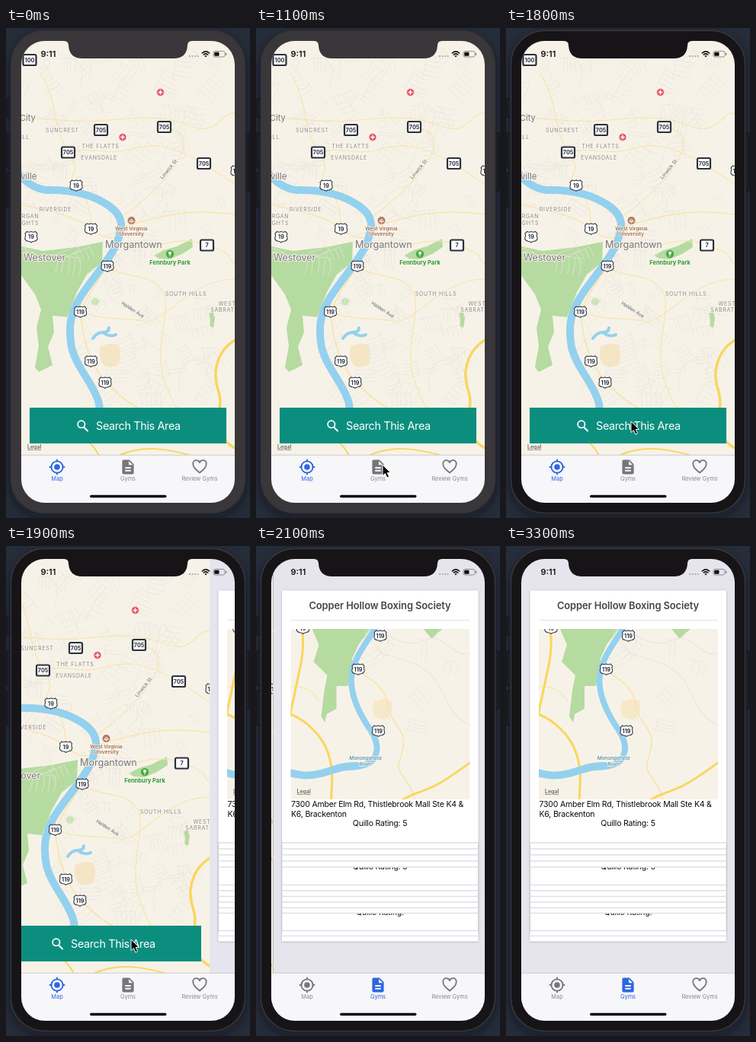
An HTML page for the animation above (3.4 s loop, 320 by 644 pixels).

```html
<!DOCTYPE html>
<html lang="en">
<head>
<meta charset="utf-8">
<title>Gym finder</title>
<style>
html, body { margin: 0; width: 100%; height: 100%; overflow: hidden; background: #262d3a; }
svg { display: block; width: 320px; height: 644px; font-family: Inter, "Liberation Sans", sans-serif; }
.line { fill: none; stroke-linecap: round; stroke-linejoin: round; }
.mid { text-anchor: middle; }
.area { font-size: 7px; letter-spacing: .75px; fill: #898783; }
.town { fill: #77777a; stroke: #f7f2e8; stroke-width: 2px; paint-order: stroke; }
.street { font-size: 6.4px; fill: #5f5e5e; }
.halo { stroke: #faf6ee; stroke-width: 1.5px; paint-order: stroke; }
.body { font-size: 10.5px; letter-spacing: -.2px; fill: #0a0a0a; }
.tab { fill: #77777a; color: #77777a; font-size: 7.4px; }
.tab text { fill: #8a8a8d; }
.tab.on, .tab.on text { fill: #2d66e2; color: #2d66e2; }
</style>
</head>
<body>
<svg id="stage" viewBox="0 0 320 644"></svg>
<script>
const LOOP = 3400, STEP = 100;

// Drawing helpers
const line = (d, color, width) => `<path class="line" d="${d}" stroke="${color}" stroke-width="${width}"/>`;
const area = (d, color) => `<path d="${d}" fill="${color}"/>`;
const text = (x, y, s, cls = '', attrs = '') => `<text x="${x}" y="${y}" class="${cls}" ${attrs}>${s}</text>`;
const box = (x, y, w, h, color, attrs = '') => `<rect x="${x}" y="${y}" width="${w}" height="${h}" fill="${color}" ${attrs}/>`;
const at = (x, y, s, k = 1) => `<g transform="translate(${x} ${y}) scale(${k})">${s}</g>`;
const place = (draw, list) => list.map(p => draw(...p)).join('');

const sign = (x, y, s) => at(x, y,
  box(-8.5, -7, 17, 14, '#fff', 'rx="1.8" stroke="#2c303c" stroke-width="2.2"') +
  text(0, 2.7, s, 'mid', 'font-size="7.2" font-weight="700" fill="#2c303c"'));

const shield = (x, y, s) => at(x, y,
  `<path d="M-5.5-7Q-3-5.5 0-7Q3-5.5 5.5-7L8-4.5Q6.7-2 8 1Q8.7 5 4 5.8Q1.5 6 0 7.4Q-1.5 6-4 5.8Q-8.7 5-8 1Q-6.7-2-8-4.5Z"
    fill="#fff" stroke="#353840" stroke-width="1.1"/>` +
  text(0, 2.7, s, 'mid', 'font-size="7.2" font-weight="700" fill="#2c303c"'));

const clinic = (x, y) => at(x, y,
  '<circle r="4.8" fill="#e2525f" stroke="#f5c5c5" stroke-width=".8"/>' + line('M-2.2 0H2.2M0-2.2V2.2', '#fff', 1.5));

// Faint local streets: small skewed grids and long wandering lanes
function streets(x, y, w, h, blocks, seed) {
  const rnd = () => (seed = seed * 16807 % 2147483647) / 2147483647;
  let d = '';
  for (let i = 0; i < blocks; i++) {
    const cx = x + rnd() * w, cy = y + rnd() * h, a = rnd() * 3, n = 2 + rnd() * 4 | 0, gap = 4 + rnd() * 4;
    const ux = Math.cos(a), uy = Math.sin(a), len = 10 + rnd() * 18;
    for (let k = 0; k < n; k++) {
      const px = cx - uy * gap * k, py = cy + ux * gap * k;
      d += `M${px.toFixed(1)} ${py.toFixed(1)}q${(ux * len / 2 + rnd() * 3).toFixed(1)} ${(uy * len / 2 + rnd() * 3).toFixed(1)} ${(ux * len).toFixed(1)} ${(uy * len).toFixed(1)}`;
    }
    d += `M${cx.toFixed(1)} ${cy.toFixed(1)}l${(-uy * gap * n).toFixed(1)} ${(ux * gap * n).toFixed(1)}`;
    if (i % 4 == 0) d += `q${(rnd() * 40 - 20).toFixed(1)} 12 ${(rnd() * 60 - 30).toFixed(1)} ${(rnd() * 40).toFixed(1)}`;
  }
  return line(d, LANE, .7);
}

const CREAM = '#f7f2e8', WATER = '#94d1ee', GREEN = '#b5dba0', ROAD = '#f8e5ad', MAIN = '#f9d65d', LANE = '#eae4db';

const cityMap = box(20, 17, 280, 544, CREAM) +
  area('M20 287L48 293L92 288L127 281L126 308L106 324L93 347L80 380L61 378L63 400L55 419L61 443L43 452L38 446L43 418L40 394L46 370L38 350L20 325Z', GREEN) +
  area('M194 299L207 292L224 287L244 277L245 288L231 297L214 304L201 303Z', GREEN) +
  area('M112 357l6-3 5 5-4 6-7-2z', '#c9e4b6') +
  area('M266 375l6-2 2 8-2 13-5-2 1-8z', GREEN) +
  area('M124 419q12-7 24-2q5 13-1 26q-12 6-20-1q-7-10-3-23z', '#f4e6c5') +
  streets(30, 30, 255, 130, 38, 71) + streets(22, 170, 265, 150, 46, 913) + streets(105, 320, 180, 165, 36, 4407) +
  place(line, [
    ['M45 60C70 100 60 130 82 163S75 190 92 207S110 240 112 264', ROAD, 1.3],
    ['M20 118C50 118 90 125 125 122S200 112 240 128S280 110 300 112', ROAD, 1.3],
    ['M82 163C110 155 130 168 160 160S210 150 259 178L300 205', ROAD, 1.2],
    ['M150 250C190 220 210 200 225 175S235 135 208 130', ROAD, 1.2],
    ['M150 262C190 252 230 235 300 245', ROAD, 1.5],
    ['M20 232C50 240 90 245 112 264S140 270 150 280', ROAD, 1.4],
    ['M147 285C190 300 220 268 264 285S285 300 300 310', ROAD, 1.3],
    ['M133 313C150 330 190 320 205 345S190 420 210 470S225 490 225 500', ROAD, 1.3],
    ['M97 373C130 385 150 380 180 385S240 330 300 330', ROAD, 1.2],
    ['M133 313L113 343L97 373L103 410L112 438L130 466L158 490L190 510', ROAD, 1.7],
    ['M304 408C287 417 277 432 275 452S284 480 280 500S278 540 300 552', MAIN, 3.4],
    ['M48 500C80 522 112 540 122 562M150 561C180 548 210 553 240 561', MAIN, 2]
  ]) +
  line('M14 188Q29 209 52 213C82 212 112 218 134 233S154 263 143 288C130 313 107 336 95 358S82 396 86 420C93 447 113 465 121 490S105 528 60 526', WATER, 10) +
  line('M114 408Q119 400 127 400T135 394M127 400Q136 407 144 403', WATER, 4) +
  place((x, y, s) => text(x, y, s, 'area halo mid'), [
    [74, 137, 'SUNCREST'], [124, 158, 'THE FLATTS'], [122, 172.5, 'EVANSDALE'], [65, 241, 'RIVERSIDE'],
    [32, 250, 'RGAN'], [32, 259, 'GHTS'], [236, 352, 'SOUTH HILLS'], [290, 365, 'WEST'], [284, 373, 'SABRAT'], [25, 146, 'ILL']]) +
  place((x, y, s, size) => text(x, y, s, 'town', `font-size="${size}"`), [
    [18, 122, 'City', 11], [19, 199, 'ville', 11.5], [23, 305.5, 'Westover', 12.4], [130, 289, 'Morgantown', 12.6]]) +
  text(0, 0, 'Linwick St', 'street halo mid', 'transform="translate(215 187) rotate(-51)"') +
  text(0, 0, 'Halden Ave', 'street halo mid', 'transform="translate(165 372) rotate(33)"') +
  '<circle cx="164.5" cy="253" r="5" fill="#b27c62"/>' + line('M162 254l2.5-3 2.5 3zM164.5 254v2', '#fff', 1) +
  text(164.5, 265.5, 'West Virginia', 'mid halo', 'font-size="6.6" font-weight="600" fill="#a3694d"') +
  text(164.5, 273, 'University', 'mid halo', 'font-size="6.6" font-weight="600" fill="#a3694d"') +
  '<circle cx="215" cy="297" r="5.2" fill="#49ad42"/>' + line('M215 300v-3', '#fff', 1) + '<circle cx="215" cy="295.8" r="2" fill="#fff"/>' +
  text(215, 311, 'Fennbury Park', 'mid halo', 'font-size="7.5" font-weight="700" fill="#2d9a2c"') +
  place(clinic, [[202.5, 84.5], [153, 143.5]]) +
  place(sign, [[31, 42, 100], [124.5, 134, 705], [207.5, 130, 705], [81.5, 163.5, 705], [259.5, 178, 705], [263.5, 285.5, 7]]) +
  place(shield, [[92, 207, 19], [111.5, 264, 19], [33, 274.5, 19], [303, 188, 119], [133, 313, 119], [97.5, 373, 119],
    [111.5, 438, 119], [130, 466, 119], [244, 533, 119]]) +
  text(108, 511, 'Monongahela', 'mid', 'font-size="6.5" font-style="italic" fill="#3d839c"') +
  text(28, 553, 'Legal', 'halo', 'font-size="7" font-weight="600" fill="#65625f" text-decoration="underline"');

const button = '<g id="button">' + box(31, 499, 258, 47, '#0c8e7f') +
  line('M102.5 525L107 529.5', '#fff', 2) + '<circle cx="98.8" cy="520.8" r="4.7" fill="none" stroke="#fff" stroke-width="1.7"/>' +
  text(118, 528, 'Search This Area', '', 'font-size="14.4" letter-spacing="-.35" fill="#fff"') + '</g>';

const cardMap = '<g clip-path="url(#inset)">' + box(43, 109, 235, 224, CREAM) +
  area('M71 109H148L133 128L124 147L118 184H103V214L90 221L88 232L83 224L87 190L91 170L73 152L80 130Z', GREEN) +
  area('M217 109H242L236 114L228 122Z', GREEN) +
  area('M153 204q12-6 22 0q3 11-3 21q-9 6-18 0q-7-10-1-21z', '#f7e9c8') +
  streets(165, 118, 100, 110, 9, 557) +
  place(line, [
    ['M160 140C190 152 222 150 240 188S262 225 280 238', LANE, 1.1],
    ['M160 109C190 135 208 128 225 122S260 150 278 140', LANE, 1.1],
    ['M128 162C150 176 166 184 170 208S190 238 191 256S180 286 186 296S203 318 206 335', ROAD, 1.7],
    ['M43 185Q70 183 80 204', ROAD, 1.1],
    ['M58 107C62 140 55 160 50 185S45 207 42 224', MAIN, 3],
    ['M40 220C62 228 84 248 92 272S97 310 96 335', MAIN, 3],
    ['M282 282C262 296 246 309 228 317S201 326 187 335', MAIN, 2.8],
    ['M155 106C141 130 126 146 123 170S132 218 145 238C158 256 160 272 148 284Q136 292 110 291', WATER, 7.8],
    ['M130 289C112 288 98 295 82 299S56 302 38 297', WATER, 10]
  ]) +
  place(shield, [[59, 108, 19], [160.5, 118, 119], [131.5, 162, 119], [158, 243, 119]]) +
  text(141, 281, 'Monongahela', 'mid halo', 'font-size="6.4" font-style="italic" font-weight="500" fill="#408aa5"') +
  text(141, 288.5, 'River', 'mid halo', 'font-size="6.4" font-style="italic" font-weight="500" fill="#408aa5"') +
  text(51, 325, 'Legal', 'halo', 'font-size="7" font-weight="600" fill="#65625f" text-decoration="underline"') + '</g>';

const rating = (y, s) => text(160, y, s, 'body mid');
const edges = [390, 398, 406, 414, 422, 445.5, 453, 460.5, 468, 475.5, 482.5, 505.5, 512.5];
const gyms = box(20, 17, 280, 544, '#e6e5ee') +
  box(31.5, 58.5, 257.5, 461, '#fff', 'filter="url(#soft)"') +
  line('M31.4 390V508M289.1 390V508', '#b9bbc1', .7) +
  text(160, 82.5, 'Copper Hollow Boxing Society', 'mid', 'font-size="12.9" font-weight="600" letter-spacing="-.08" fill="#43484d"') +
  line('M44 97.5H277', '#dfe1e5', 1) + cardMap +
  text(43.5, 343, '7300 Amber Elm Rd, Thistlebrook Mall Ste K4 &amp;', 'body') + text(43.5, 355.5, 'K6, Brackenton', 'body') +
  rating(368, 'Quillo Rating: 5') +
  '<g clip-path="url(#peek)">' + rating(425, 'Quillo Rating: 5') + rating(484.8, 'Quillo Rating:') + '</g>' +
  edges.map(y => line(`M32 ${y}H288.5`, '#dde1e5', 1.3)).join('');

const icons = {
  map: '<path d="M12 8a4 4 0 1 0 0 8a4 4 0 0 0 0-8z"/><circle cx="12" cy="12" r="8" fill="none" stroke="currentColor" stroke-width="2"/>' +
    line('M12 2V4M12 20V22M2 12H4M20 12H22', 'currentColor', 2),
  file: '<path d="M14 2H6q-2 0-2 2v16q0 2 2 2h12q2 0 2-2V8zM16 18H8v-2h8zM16 14H8v-2h8zM13 9V3.5L18.5 9z" fill-rule="evenodd"/>',
  heart: line('M12 20C5.5 14.3 3 12 3 8.5A4.6 4.6 0 0 1 12 6A4.6 4.6 0 0 1 21 8.5C21 12 18.5 14.3 12 20z', 'currentColor', 1.9)
};
const tab = (id, x, icon, label) => `<g id="${id}" class="tab">` + at(x - 11.4, 565.6, icons[icon], .95) + text(x, 595.3, label, 'mid') + '</g>';
const tabs = box(20, 561, 280, 64, '#f7f6f9') + line('M20 561.3H300', '#bcbbc2', .7) +
  tab('mapTab', 67, 'map', 'Map') + tab('gymTab', 160, 'file', 'Gyms') + tab('reviewTab', 254, 'heart', 'Review Gyms') +
  box(110, 613.7, 100.5, 3.6, '#08080a', 'rx="1.8"');

const status = text(45.5, 38, '9:11', '', 'font-size="11" font-weight="600" fill="#111"') +
  [241, 244.5, 248, 251.5].map(x => `<circle cx="${x}" cy="37" r="1.1" fill="#a5a39f"/>`).join('') +
  line('M257.3 33Q262 28.8 266.7 33M259.2 35Q262 32.6 264.8 35', '#111', 1.6) + area('M260.3 36.6Q262 35.3 263.7 36.6L262 38.5Z', '#111') +
  box(272, 30.5, 15, 7.5, 'none', 'rx="2.2" stroke="#77757a" stroke-width=".8"') + box(273.2, 31.7, 6.3, 5.1, '#111', 'rx="1"') +
  box(288, 32.8, 1.2, 3, '#77757a', 'rx=".6"');

const sideKeys = [[1, 92, 26], [1, 138, 46], [1, 190, 46], [313, 138, 76]]
  .map(([x, y, h]) => box(x, y, 6, h, '#1b1e26', 'rx="1" stroke="#101218" stroke-width="1"')).join('');

const stage = document.getElementById('stage');
stage.innerHTML = `<defs>
  <clipPath id="screen"><rect x="20" y="17" width="280" height="607" rx="31"/></clipPath>
  <clipPath id="inset"><rect x="43" y="109" width="235" height="224"/></clipPath>
  <clipPath id="peek"><path d="M32 422H289V445H32ZM32 482.5H289V505H32Z"/></clipPath>
  <filter id="soft" x="-5%" y="-5%" width="110%" height="110%"><feDropShadow dx="0" dy=".5" stdDeviation="1" flood-color="#555" flood-opacity=".45"/></filter>
  <filter id="shade" x="-10%" y="-5%" width="120%" height="110%"><feGaussianBlur stdDeviation="7"/></filter>
  </defs>` + box(0, 0, 320, 644, '#262d3a') +
  box(6.5, 9, 307, 634, '#0b0d12', 'rx="44" opacity=".6" filter="url(#shade)"') + sideKeys +
  box(6.5, 3.5, 307, 634, '#3a373a', 'id="bezel" rx="44" stroke-width="1.4"') +
  '<g clip-path="url(#screen)"><g id="pages"><g>' + cityMap + button + '</g>' + at(280, 0, gyms) + '</g>' + tabs + status +
  '<path id="notch" d="M76 15V17Q82 17 82 23Q83 40 100 40H220Q237 40 238 23Q238 17 244 17V15Z"/></g>' +
  '<g id="pointer"><path d="M0 0V14.5L3.4 11.5L5.8 17L8.6 15.8L6.2 10.5H10.5Z" fill="#050505" stroke="#fff" stroke-width="1"/></g>';

// Each track is a list of [time, value]; the latest one reached holds
const tracks = {
  slide: [[0, 0], [1900, 33], [2000, 190], [2100, 277.5], [2200, 280]],
  fade: [[0, 1], [1500, .72], [1600, .93], [1700, 1]],
  active: [[0, false], [1500, true]],
  gymsOn: [[0, false], [2000, true]],
  pointer: [[0, null], [1000, [166, 597]], [1100, [166, 574]], [1200, [166, 560]], [1300, [165, 534]], [1400, [164, 517]], [2100, null]]
};
const value = (name, t) => tracks[name].filter(k => k[0] <= t).pop()[1];
const el = id => document.getElementById(id);

function draw(t) {
  const active = value('active', t), gymsOn = value('gymsOn', t), p = value('pointer', t);
  el('pages').setAttribute('transform', `translate(${-value('slide', t)} 0)`);
  el('button').setAttribute('opacity', value('fade', t));
  const shell = active ? '#161416' : '#3a373a';
  el('bezel').setAttribute('fill', shell);
  el('bezel').setAttribute('stroke', active ? '#38373a' : '#343235');
  el('notch').setAttribute('fill', shell);
  el('mapTab').classList.toggle('on', !gymsOn);
  el('gymTab').classList.toggle('on', gymsOn);
  el('pointer').setAttribute('visibility', p ? 'visible' : 'hidden');
  if (p) el('pointer').setAttribute('transform', `translate(${p})`);
}

const start = performance.now();
function tick() {
  const t = (performance.now() - start) % LOOP;
  draw(Math.floor(t / STEP) * STEP);
  requestAnimationFrame(tick);
}
tick();
</script>
</body>
</html>
```
